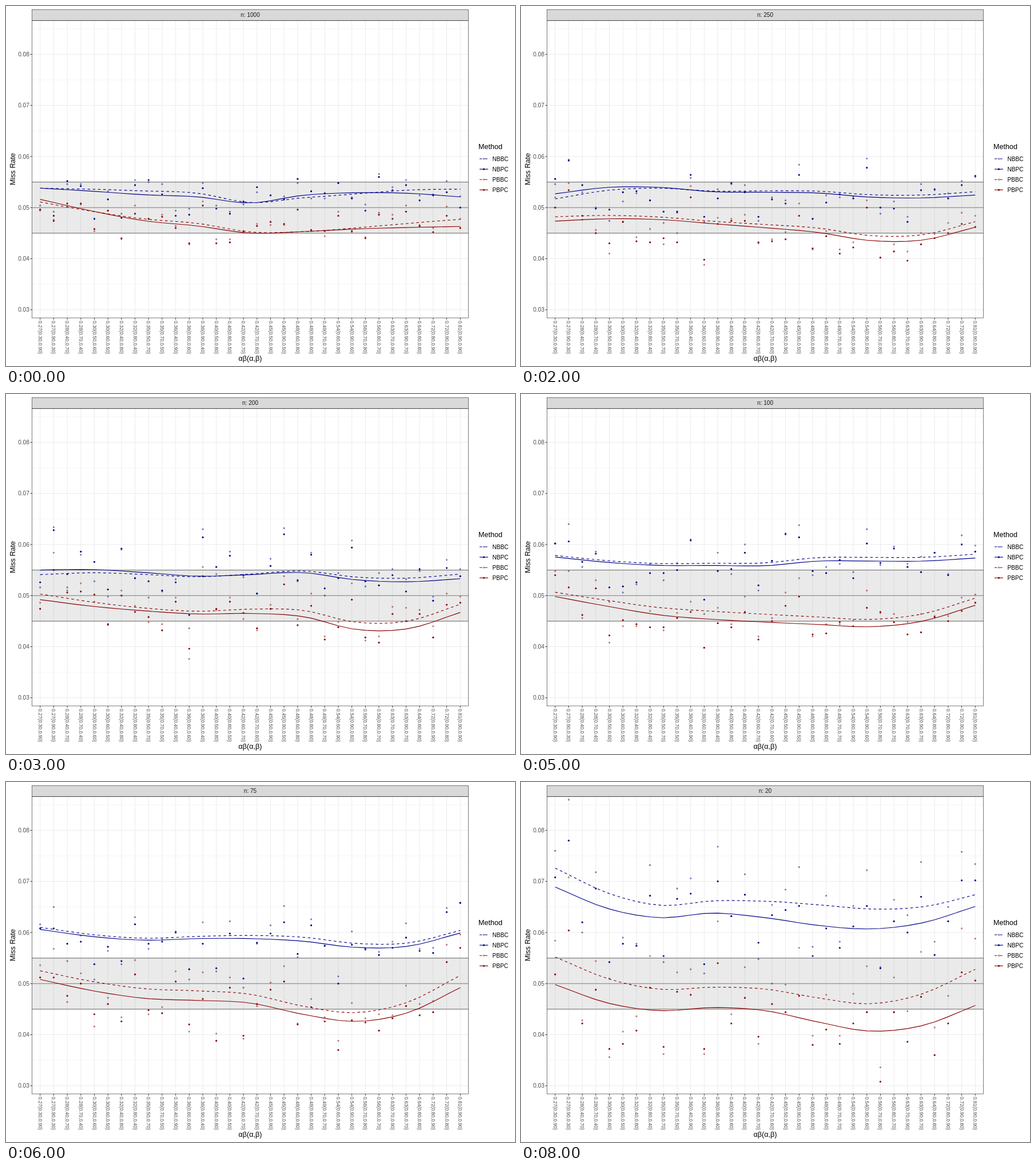
Animation, 890 px wide and 629 px high, one loop 9000 ms. Source, as an HTML page:

```html
<!DOCTYPE html>
<html lang="en">
<head>
<meta charset="utf-8">
<title>Miss rate by sample size</title>
<style>
html, body { margin: 0; width: 100%; height: 100%; overflow: hidden; background: #fff; }
svg { display: block; }
text { font-family: "Liberation Sans", Arial, sans-serif; }
</style>
</head>
<body>
<svg id="chart" width="890" height="629" viewBox="0 0 890 629"></svg>
<script>
const NS = 'http://www.w3.org/2000/svg';
const svg = document.getElementById('chart');
const BLUE = '#00008b', RED = '#8b0000', DARK = '#333', GREY = '#4d4d4d', GRID = '#ebebeb';
const LEFT = 45.5, RIGHT = 808.5, TOP = 25.3, BOTTOM = 545;
const HOLD = 1000;
const METHODS = [
  { name: 'NBBC', color: BLUE, soft: true },
  { name: 'NBPC', color: BLUE, soft: false },
  { name: 'PBBC', color: RED, soft: true },
  { name: 'PBPC', color: RED, soft: false }
];

// All products a*b of at least 0.27, in tenths, in rising order.
const pairs = [];
for (let a = 3; a < 10; a++)
  for (let b = 3; b < 10; b++)
    if (a * b >= 27) pairs.push([a, b]);
pairs.sort((p, q) => p[0] * p[1] - q[0] * q[1] || p[0] - q[0]);
const COUNT = pairs.length;

// Rates are held in units of 0.0001.
const px = i => LEFT + (i + 0.6) * (RIGHT - LEFT) / (COUNT + 0.2);
const py = v => 352.2 - (v - 500) * 0.8925;

function el(parent, tag, attrs, content) {
  const node = document.createElementNS(NS, tag);
  for (const k in attrs) node.setAttribute(k, attrs[k]);
  if (content) node.textContent = content;
  return parent.appendChild(node);
}
const line = (x1, y1, x2, y2, stroke, width = 1) =>
  el(svg, 'line', { x1, y1, x2, y2, stroke, 'stroke-width': width });
const label = (parent, content, x, y, size, fill, anchor = 'start', turn = 0) =>
  el(parent, 'text', {
    transform: `translate(${x} ${y}) rotate(${turn})`,
    'font-size': size, fill, 'text-anchor': anchor
  }, content);
const dot = (parent, x, y, m) =>
  el(parent, 'circle', { cx: x, cy: y, r: 1.6, fill: m.color, 'fill-opacity': m.soft ? 0.5 : 1 });
const stroke = (parent, d, m) =>
  el(parent, 'path', {
    d, fill: 'none', stroke: m.color, 'stroke-width': 1.15,
    'stroke-dasharray': m.soft ? '4.6 4.6' : 'none'
  });

function random(seed) {
  return () => (seed = (seed * 16807) % 2147483647) / 2147483647;
}

// Smooth curve through evenly spaced knots, u from 0 to 1.
function spline(knots, u) {
  const last = knots.length - 1;
  const at = k => k < 0 ? 2 * knots[0] - knots[1]
    : k > last ? 2 * knots[last] - knots[last - 1] : knots[k];
  const k = Math.min(Math.floor(u * last), last - 1), t = u * last - k;
  const [a, b, c, d] = [-1, 0, 1, 2].map(j => at(k + j));
  return b + t / 2 * (c - a + t * (2 * a - 5 * b + 4 * c - d + t * (3 * (b - c) + d - a)));
}

// Each family has a solid curve and the gap from it up to the dashed one.
const scene = (n, nb, nbGap, pb, pbGap) => ({ n, parts: [nb, nbGap, pb, pbGap] });
const between = (n, p, q) => scene(n, ...p.parts.map((row, r) =>
  row.map((v, k) => (v + q.parts[r][k]) / 2)));

const n1000 = scene(1000,
  [538, 532, 525, 521, 509, 524, 529, 528, 521], [0, 8, -5, 15],
  [516, 493, 474, 464, 450, 453, 458, 461, 463], [-5, 5, 0, 14]);
const n500 = scene(500,
  [504, 528, 534, 524, 519, 512, 510, 511, 516], [-11, 3, 4, 4],
  [455, 477, 483, 473, 456, 444, 437, 438, 456], [6, 4, 5, 6]);
const n200 = scene(200,
  [550, 551, 545, 538, 541, 545, 531, 527, 533], [-9, -2, 4, 9],
  [492, 479, 470, 464, 465, 459, 434, 435, 467], [11, 5, 13, 16]);
const n150 = scene(150,
  [545, 538, 533, 530, 529, 552, 564, 562, 548], [2, 4, 6, 10],
  [488, 472, 453, 440, 434, 447, 452, 457, 470], [0, 12, 13, 4]);
const n75 = scene(75,
  [606, 592, 585, 588, 588, 583, 571, 573, 599], [4, 4, 8, 5],
  [508, 486, 471, 467, 462, 440, 426, 443, 492], [17, 19, 16, 24]);
const n20 = scene(20,
  [689, 647, 629, 638, 629, 614, 607, 619, 651], [37, 23, 41, 23],
  [498, 462, 447, 453, 447, 425, 407, 418, 457], [54, 40, 49, 71]);
const scenes = [n1000, n500, between(250, n500, n200), n200, n150,
  between(100, n150, n75), n75, between(50, n75, n20), n20];

function curve({ parts }, s) {
  const f = s < 2 ? 0 : 2;
  return pairs.map((_, i) => {
    const u = i / (COUNT - 1);
    return spline(parts[f], u) + (METHODS[s].soft ? spline(parts[f + 1], u) : 0);
  });
}

// Unequal or large effects miss more often, above all in small samples.
const bias = ([a, b]) =>
  35 * (Math.abs(a - b) - 2.3) + 25 * (a + b - 14) + 50 * Math.sign(a - b);

function scatter(n, curves) {
  const rand = random(n * 977 + 5);
  const noise = sd => sd * 2 * (rand() + rand() + rand() - 1.5);
  return pairs.map(pair => {
    const shared = noise(24), family = [noise(9), noise(9)];
    return curves.map((_, s) => {
      const lean = bias(pair) * 4.5 / Math.sqrt(n) * (METHODS[s].soft ? 1 : 0.6);
      return lean + shared + family[s >> 1] + noise(4);
    });
  });
}

function drawFrame() {
  for (let v = 350; v <= 850; v += 100) line(LEFT, py(v), RIGHT, py(v), GRID, 0.55);
  for (let v = 300; v <= 800; v += 100) {
    line(LEFT, py(v), RIGHT, py(v), GRID);
    line(LEFT - 3, py(v), LEFT, py(v), DARK);
    label(svg, (v / 1e4).toFixed(2), 40.8, py(v) + 3.6, 10.1, GREY, 'end');
  }
  pairs.forEach(([a, b], i) => {
    line(px(i), TOP, px(i), BOTTOM, GRID);
    line(px(i), BOTTOM, px(i), BOTTOM + 3, DARK);
    label(svg, `${(a * b / 100).toFixed(2)}(0.${a}0,0.${b}0)`, px(i) - 3, 550, 8.55, GREY, 'start', 90);
  });
  el(svg, 'rect', {
    x: LEFT, y: py(550), width: RIGHT - LEFT, height: py(450) - py(550),
    fill: '#7f7f7f', 'fill-opacity': 0.16
  });
  for (const v of [450, 500, 550]) line(LEFT, py(v), RIGHT, py(v), '#7f7f7f', 1.1);
}

function drawBorders() {
  const box = (y, height, fill) => el(svg, 'rect', {
    x: LEFT, y, width: RIGHT - LEFT, height, fill, stroke: DARK, 'stroke-width': 0.65
  });
  box(6.2, TOP - 6.2, '#d9d9d9');
  box(TOP, BOTTOM - TOP, 'none');
  label(svg, 'αβ(α,β)', 427, 620.3, 12.6, '#000', 'middle');
  label(svg, 'Miss Rate', 15.5, 285, 12.6, '#000', 'middle', -90);
  label(svg, 'Method', 826, 250, 12.6, '#000');
  METHODS.forEach((m, i) => {
    const y = 267 + i * 18.1;
    stroke(svg, `M828 ${y}H843`, m);
    dot(svg, 835.5, y, m);
    label(svg, m.name, 850.5, y + 3.7, 10.1, '#000');
  });
}

function drawScene(sc) {
  const g = el(svg, 'g', { visibility: 'hidden' });
  const curves = METHODS.map((_, s) => curve(sc, s));
  const offsets = scatter(sc.n, curves);
  METHODS.forEach((m, s) => curves[s].forEach((v, i) =>
    dot(g, px(i), py(2 * Math.round((v + offsets[i][s]) / 2)), m)));
  METHODS.forEach((m, s) => stroke(g, 'M' + curves[s].map((v, i) =>
    `${px(i).toFixed(2)} ${py(v).toFixed(2)}`).join('L'), m));
  label(g, `n: ${sc.n}`, 427, 19.3, 10.1, '#1a1a1a', 'middle');
  return g;
}

drawFrame();
drawBorders();
const groups = scenes.map(drawScene);
const start = performance.now();

function tick() {
  const now = Math.floor((performance.now() - start) / HOLD) % groups.length;
  groups.forEach((g, i) => g.setAttribute('visibility', i === now ? 'visible' : 'hidden'));
  requestAnimationFrame(tick);
}
tick();
</script>
</body>
</html>
```
